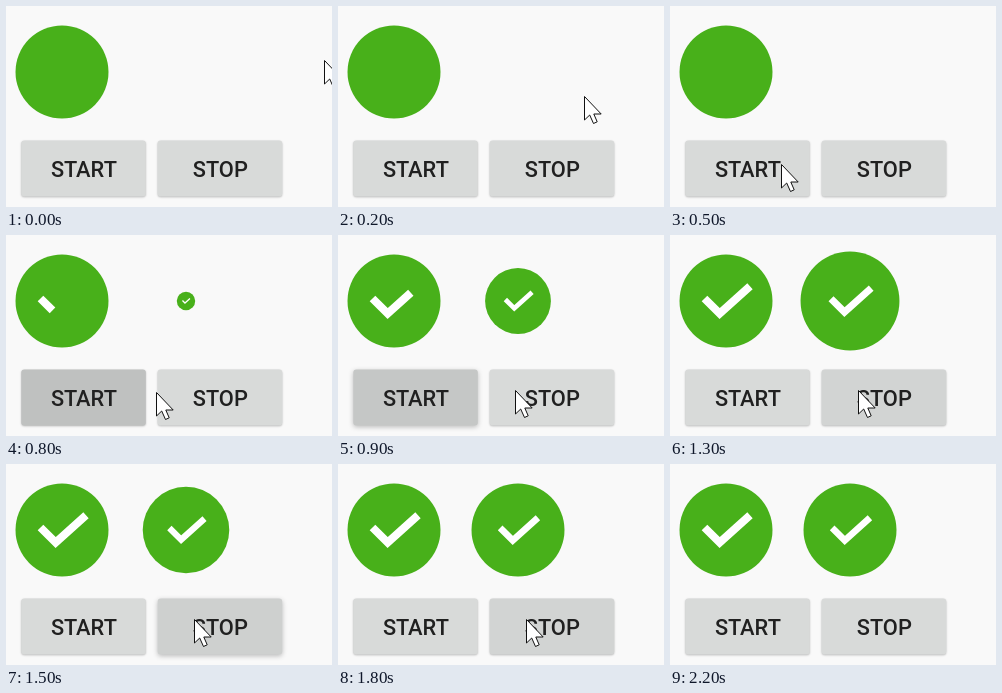
An HTML page with a canvas that plays this animation: 326x201 px, repeating every 3.6 s.

```html
<!DOCTYPE html>
<html lang="en">
<head>
<meta charset="utf-8">
<title>Check mark animation</title>
<style>
  html, body { margin: 0; width: 100%; height: 100%; overflow: hidden; background: #f9f9f9; }
  canvas { display: block; width: 326px; height: 201px; }
</style>
</head>
<body>
<canvas id="stage" width="326" height="201"></canvas>
<script>
const ctx = document.getElementById('stage').getContext('2d');
const LOOP = 3600, STEP = 100;
const START_PRESS = 700, STOP_PRESS = 1300, CURSOR_GONE = 2200;
const CURSOR_HOME = { x: 318, y: 54 };
const CURSOR_MOVES = [
  { from: 0, to: 500, x: 111, y: 158 },
  { from: 600, to: 1000, x: 188, y: 155 },
  { from: 1800, to: CURSOR_GONE, x: 325, y: 73 },
];
const ARROW = new Path2D('M0 0V23.5L5.2 18.5L9 27L12.7 25.3L9.3 17.5H16.7Z');

const mix = (a, b, k) => a + (b - a) * k;
const progress = (t, start, end) => Math.min(1, Math.max(0, (t - start) / (end - start)));
const easeInOut = x => (1 - Math.cos(Math.PI * x)) / 2;

// Rises from 0 to 1 at the peak, then falls back to 0.
const pulse = (t, start, peak, end) => progress(t, start, peak) - progress(t, peak, end);

// Underdamped spring from 0 to 1, at rest after its first full swing.
function spring(seconds) {
  if (seconds <= 0) return 0;
  if (seconds >= 1.08) return 1;
  const damping = 3.42, speed = 8.06;
  return 1 - Math.exp(-damping * seconds) *
    (Math.cos(speed * seconds) + damping / speed * Math.sin(speed * seconds));
}

function drawButton(t, x, label, pressTime, darkening, fade) {
  const press = pulse(t, pressTime - 100, pressTime + 100, pressTime + 100 + fade);
  const lift = pulse(t, pressTime + 100, pressTime + 200, pressTime + 400);
  const shade = Math.round(216 - darkening * press);
  ctx.save();
  ctx.shadowColor = 'rgba(0,0,0,0.25)';
  ctx.shadowBlur = mix(2, 5, lift);
  ctx.shadowOffsetY = mix(0.8, 1.5, lift);
  ctx.fillStyle = `rgb(${shade},${shade + 2},${shade + 1})`;
  ctx.beginPath();
  ctx.roundRect(x, 134.5, 124.5, 56, 3);
  ctx.fill();
  ctx.restore();

  ctx.fillStyle = '#202020';
  ctx.font = '500 21.8px Roboto, sans-serif';
  ctx.textAlign = 'center';
  ctx.fillText(label, x + 62.6, 171);
}

function drawBadge(x, scale, checkScale, drawn) {
  ctx.save();
  ctx.translate(x, 66);
  ctx.scale(scale, scale);
  ctx.fillStyle = '#48b01a';
  ctx.beginPath();
  ctx.arc(0, 0, 46.5, 0, 2 * Math.PI);
  ctx.fill();
  if (drawn > 0) {
    ctx.scale(checkScale, checkScale);
    ctx.strokeStyle = '#fff';
    ctx.lineWidth = 8;
    ctx.setLineDash([63 * drawn, 100]);
    ctx.beginPath();
    ctx.moveTo(-21.5, -2.5);
    ctx.lineTo(-6.3, 12.5);
    ctx.lineTo(24, -14.7);
    ctx.stroke();
  }
  ctx.restore();
}

function drawCursor(t) {
  let { x, y } = CURSOR_HOME;
  for (const move of CURSOR_MOVES) {
    const k = easeInOut(progress(t, move.from, move.to));
    x = mix(x, move.x, k);
    y = mix(y, move.y, k);
  }
  ctx.save();
  ctx.translate(Math.round(x) + 0.5, Math.round(y) + 0.5);
  ctx.fillStyle = '#fff';
  ctx.strokeStyle = '#111';
  ctx.lineJoin = 'round';
  ctx.fill(ARROW);
  ctx.stroke(ARROW);
  ctx.restore();
}

function draw(t) {
  ctx.fillStyle = '#f9f9f9';
  ctx.fillRect(0, 0, 326, 201);

  drawBadge(56, 1, 1, easeInOut(progress(t, 710, 970)));
  drawBadge(180, spring((t - 720) / 1000), 0.83, 1);
  drawButton(t, 15.3, 'START', START_PRESS, 25, 400);
  drawButton(t, 151.7, 'STOP', STOP_PRESS, 12, 800);
  if (t < CURSOR_GONE) drawCursor(t);
}

function frame(now) {
  draw(Math.floor(now % LOOP / STEP) * STEP);
  requestAnimationFrame(frame);
}
requestAnimationFrame(frame);
</script>
</body>
</html>
```
